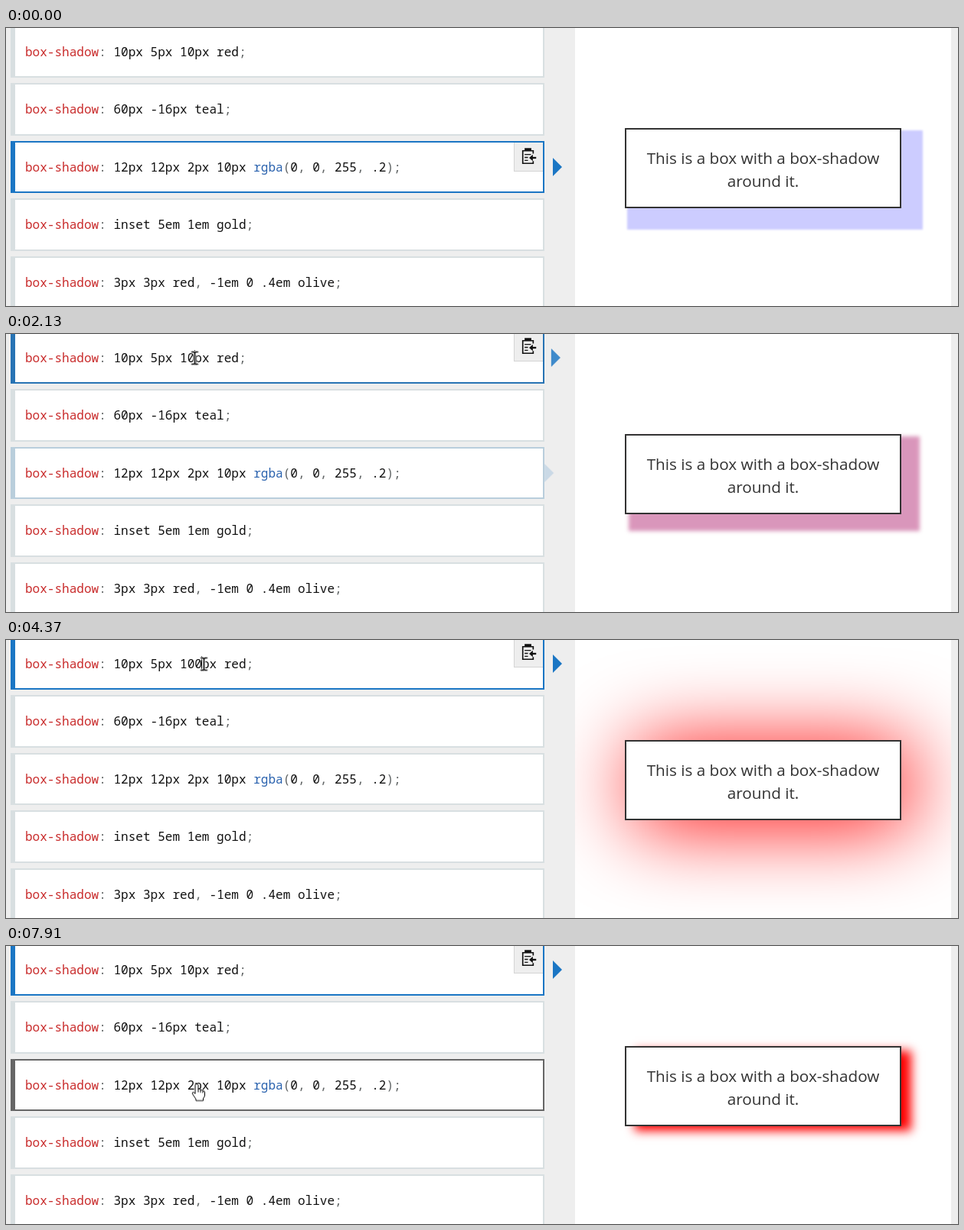
An HTML page that plays this animation: 1243x364 px, repeating every 8 s.

```html
<!DOCTYPE html>
<html lang="en">
<head>
<meta charset="utf-8">
<title>box-shadow demo</title>
<style>
  html, body { margin: 0; width: 100%; height: 100%; overflow: hidden; background: #eee; }
  .stage { position: relative; width: 1243px; height: 364px; overflow: hidden; }
  .stage * { box-sizing: border-box; }
  .stage, .stage * { animation: 0s linear infinite; }

  /* code choices */
  .row {
    position: absolute; left: 6px; top: var(--y); width: 697px; height: var(--h, 69px);
    background: #fff; border: 2px solid #d8dfe1; border-left-width: 6px;
    animation-duration: 8s; animation-timing-function: ease-out;
  }
  .row code {
    position: absolute; left: 13px; top: 21px; white-space: pre; color: #111;
    font: 16.04px/22px "Noto Sans Mono", "DejaVu Sans Mono", monospace;
  }
  .row b { font-weight: 400; color: #c92c2c; }
  .row i { font-style: normal; color: #5f6364; }
  .row u { text-decoration: none; color: #2a62ae; }
  #first { animation-name: first-border; }
  #first code { top: 22px; }
  #second { animation-name: second-border; }
  #third { animation-name: third-border; }
  #fourth { animation-name: fourth-border; }

  @keyframes first-border {
    0%, 14% { border-color: #d8dfe1; }
    16.5%, 25% { border-color: #666; }
    27.5%, 100% { border-color: #1b76c4; }
  }
  @keyframes second-border {
    0%, 9.5% { border-color: #d8dfe1; }
    11.5%, 12.3% { border-color: #666; }
    15%, 81.4% { border-color: #d8dfe1; }
    83.8%, 84.1% { border-color: #666; }
    86.6%, 100% { border-color: #d8dfe1; }
  }
  @keyframes third-border {
    0%, 25% { border-color: #1b76c4; }
    27.5%, 84.4% { border-color: #d8dfe1; }
    86.9%, 100% { border-color: #666; }
  }
  @keyframes fourth-border {
    0%, 6.1% { border-color: #d8dfe1; }
    7.2% { border-color: #777; }
    9.7%, 100% { border-color: #d8dfe1; }
  }

  /* selection marker and copy button */
  .marker {
    position: absolute; left: 714px; top: var(--y);
    border: 12.5px solid transparent; border-left: 12px solid #1b76c4; border-right: 0;
    animation-duration: 8s; animation-timing-function: ease-out;
  }
  .copy {
    position: absolute; left: 663px; top: var(--y); width: 38px; height: 38px;
    background: #eee; border: solid #d4d4d4; border-width: 0 0 1px 1px;
    animation-duration: 8s; animation-timing-function: step-end;
  }
  .copy svg { display: block; }
  .marker.shown { animation-name: marker-in; }
  .marker.gone { animation-name: marker-out; }
  .copy.shown { animation-name: copy-in; }
  .copy.gone { animation-name: copy-out; }
  @keyframes marker-in {
    0%, 25% { opacity: 0; transform: translateX(-13px); }
    27.5%, 100% { opacity: 1; transform: none; }
  }
  @keyframes marker-out {
    0%, 25% { opacity: 1; transform: none; }
    27.5%, 100% { opacity: 0; transform: translateX(-13px); }
  }
  @keyframes copy-in { 0% { opacity: 0; } 25%, 100% { opacity: 1; } }
  @keyframes copy-out { 0% { opacity: 1; } 25%, 100% { opacity: 0; } }

  /* typed digit */
  .zero { position: absolute; animation: zero 8s step-end infinite; }
  .tail { position: relative; animation: tail 8s step-end infinite; }
  @keyframes zero { 0% { opacity: 0; } 51.1% { opacity: 1; } 66.2%, 100% { opacity: 0; } }
  @keyframes tail { 0% { left: 0; } 51.1% { left: 9.625px; } 66.2%, 100% { left: 0; } }

  .caret {
    position: absolute; left: 246px; top: 21px; width: 1px; height: 20px; background: #000;
    animation: caret 8s step-end infinite;
  }
  @keyframes caret {
    0% { opacity: 0; left: 246px; }
    24.85% { opacity: 1; }
    30.2% { opacity: 0; }
    36.7% { opacity: 1; }
    43.6% { opacity: 0; }
    50.2% { opacity: 1; left: 246px; }
    51.1% { left: 255px; }
    58% { opacity: 0; }
    64.6% { opacity: 1; left: 255px; }
    66.2% { left: 246px; }
    72.2% { opacity: 0; }
    78.9% { opacity: 1; }
    85.5% { opacity: 0; }
    92.2% { opacity: 1; }
    98.85%, 100% { opacity: 0; left: 246px; }
  }

  /* preview */
  .preview { position: absolute; left: 743px; top: 0; width: 491px; height: 364px; background: #fff; overflow: hidden; }
  .box {
    position: absolute; left: 65px; top: 131px; width: 361px; height: 105px; padding-top: 22px;
    background: #fff; border: 2px solid #333; color: #333; text-align: center; white-space: nowrap;
    font: 20.7px/30px "Open Sans", "Noto Sans", sans-serif;
    animation: shadow 8s ease-in-out infinite;
  }
  @keyframes shadow {
    0%, 25.3% { box-shadow: 15px 15px 2.5px 12.5px rgba(0, 0, 255, .2); }
    29.05%, 51.9% { box-shadow: 12.5px 6.25px 12.5px 0 red; }
    55.65%, 68.4% { box-shadow: 12.5px 6.25px 125px 0 red; }
    72.15%, 100% { box-shadow: 12.5px 6.25px 12.5px 0 red; }
  }

  /* mouse pointer: hot spot at the origin */
  .pointer { position: absolute; left: 0; top: 0; width: 1px; height: 1px; overflow: visible; animation: travel 8s linear infinite; }
  .pointer g { animation-duration: 8s; animation-timing-function: step-end; }
  .arrow { animation-name: arrow; }
  .hand { animation-name: hand; }
  .beam { animation-name: beam; }
  @keyframes travel {
    0%, 4.1% { transform: translate(975px, 340px); }
    6.25% { transform: translate(690px, 262px); }
    7% { transform: translate(570px, 232px); }
    8.75% { transform: translate(420px, 165px); }
    9.6% { transform: translate(345px, 140px); }
    10.75% { transform: translate(270px, 98px); }
    12%, 12.4% { transform: translate(230px, 68px); }
    13.75% { transform: translate(229px, 65px); }
    17.5% { transform: translate(238px, 44px); }
    23.25%, 26.7% { transform: translate(246.5px, 31.5px); }
    31%, 77.9% { transform: translate(258.5px, 31.5px); }
    81% { transform: translate(264px, 62px); }
    83.25% { transform: translate(267px, 125px); }
    85% { transform: translate(270px, 158px); }
    87.75% { transform: translate(272px, 178px); }
    92.5% { transform: translate(258px, 182px); }
    96.4%, 100% { transform: translate(249px, 180.5px); }
  }
  @keyframes arrow {
    0% { opacity: 0; }
    4.1% { opacity: 1; }
    6.1% { opacity: 0; }
    11.8% { opacity: 1; }
    14%, 100% { opacity: 0; }
  }
  @keyframes hand {
    0% { opacity: 0; }
    6.1% { opacity: 1; }
    7.3% { opacity: 0; }
    9.4% { opacity: 1; }
    11.8% { opacity: 0; }
    14% { opacity: 1; }
    24.85% { opacity: 0; }
    81.2%, 100% { opacity: 1; }
  }
  @keyframes beam {
    0% { opacity: 0; }
    7.3% { opacity: 1; }
    9.4% { opacity: 0; }
    24.85% { opacity: 1; }
    81.2%, 100% { opacity: 0; }
  }
</style>
</head>
<body>
<svg width="0" height="0" style="position:absolute">
  <symbol id="clipboard" viewBox="0 0 38 38">
    <g fill="none" stroke="#111" stroke-width="1.7">
      <path d="M25 15V11H11V28H25V25"/>
      <path d="M15 11V9H21V11" stroke-width="3"/>
      <path d="M13.5 16H22M13.5 20H18M13.5 24H18" stroke-width="1.4"/>
      <path d="M29 20.5H22" stroke-width="2.4"/>
    </g>
    <path d="M19.5 20.5L24.5 16.2V24.8Z" fill="#111"/>
  </symbol>
</svg>

<div class="stage">
  <div class="row" id="first" style="--y:-4px"><code><b>box-shadow</b><i>:</i> 10px 5px 10<span class="zero">0</span><span class="tail">px red<i>;</i></span></code></div>
  <div class="row" id="second" style="--y:72px"><code><b>box-shadow</b><i>:</i> 60px -16px teal<i>;</i></code></div>
  <div class="row" id="third" style="--y:148px;--h:68px"><code><b>box-shadow</b><i>:</i> 12px 12px 2px 10px <u>rgba</u><i>(</i>0<i>,</i> 0<i>,</i> 255<i>,</i> .2<i>);</i></code></div>
  <div class="row" id="fourth" style="--y:223px"><code><b>box-shadow</b><i>:</i> inset 5em 1em gold<i>;</i></code></div>
  <div class="row" style="--y:299px"><code><b>box-shadow</b><i>:</i> 3px 3px red<i>,</i> -1em 0 .4em olive<i>;</i></code></div>

  <div class="copy shown" style="--y:-2px"><svg width="37" height="37"><use href="#clipboard"/></svg></div>
  <div class="copy gone" style="--y:150px"><svg width="37" height="37"><use href="#clipboard"/></svg></div>
  <div class="marker shown" style="--y:18.5px"></div>
  <div class="marker gone" style="--y:169.5px"></div>

  <div class="preview"><div class="box">This is a box with a box-shadow<br>around it.</div></div>

  <div class="caret"></div>
  <svg class="pointer">
    <g class="arrow"><path d="M.5 .5V16.5L4.2 13L6.5 18.2L9 17.1L6.7 12H11.5Z" fill="#fff" stroke="#000"/></g>
    <g class="hand">
      <path d="M-2 1.5Q-2 0 0 0T2 1.5V6.5Q5 6 5 8Q8 7.5 8 9Q10.5 9 10.5 11V15Q10.5 17 8.5 19V22H-1V20L-5 14Q-6.5 12 -5 11Q-3.5 10.5 -2 13Z" fill="#fff" stroke="#000"/>
      <path d="M2 6V11M5 8V11.5M8 9V12" stroke="#000"/>
    </g>
    <g class="beam" fill="none">
      <path id="stem" d="M-4.5 -8H-1.5L0 -7L1.5 -8H4.5M0 -7V7M-4.5 8H-1.5L0 7L1.5 8H4.5" stroke="#fff" stroke-width="3.6"/>
      <path d="M-4.5 -8H-1.5L0 -7L1.5 -8H4.5M0 -7V7M-4.5 8H-1.5L0 7L1.5 8H4.5" stroke="#000" stroke-width="1.6"/>
    </g>
  </svg>
</div>
</body>
</html>
```
